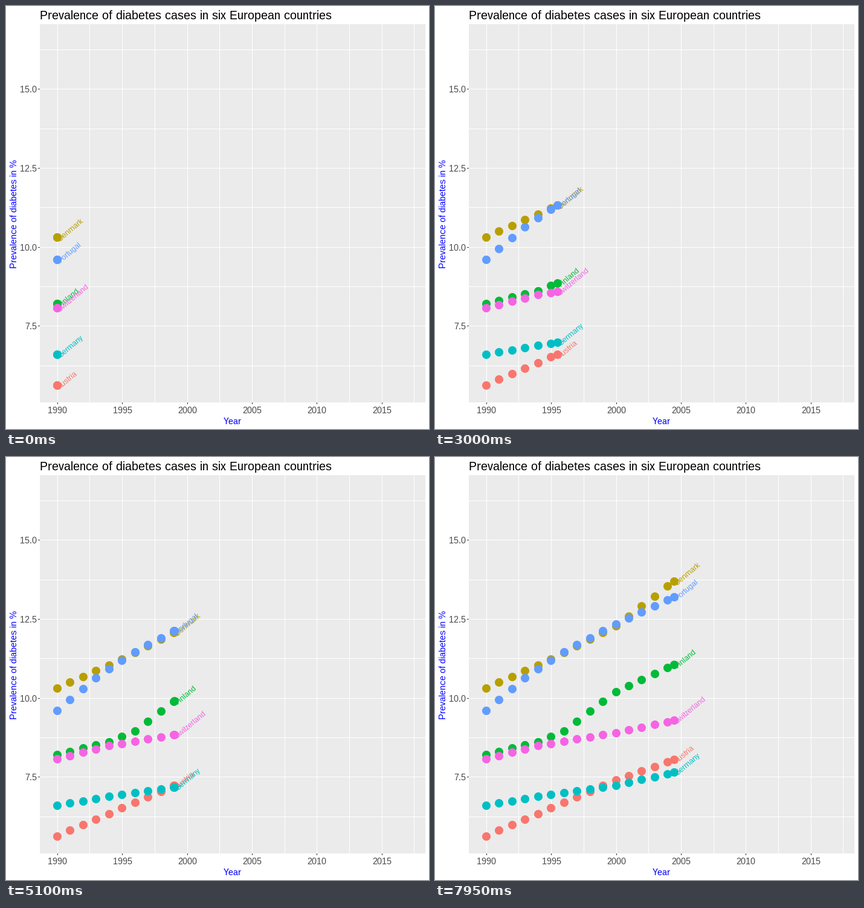
Animation of 700 by 700 pixels, one loop 8000 ms. Source, as a matplotlib script:

```python
import numpy as np
import matplotlib
import matplotlib.pyplot as plt
from matplotlib.animation import FuncAnimation
from matplotlib.collections import PolyCollection
from matplotlib.patches import Rectangle

SIZE, DPI = 700, 100
TICK_MS, STEP_TICKS, LOOP_MS = 50, 3, 8000
STEPS_PER_YEAR = 99 / 27
LEFT, RIGHT, TOP, BOTTOM = 56, 694, 30, 656
RADIUS, LABEL_ANGLE, LABEL_PX = 7, 40, 12

# Colour and turning points of each trend: years since 1990 -> prevalence in %
COUNTRIES = {
    "Austria": ("#F8766D", {0: 5.63, 10: 7.40, 15: 8.12}),
    "Denmark": ("#B79F00", {0: 10.31, 5: 11.22, 10: 12.28, 15: 13.85}),
    "Finland": ("#00BA38", {0: 8.21, 4: 8.61, 6: 8.95, 10: 10.20, 15: 11.15}),
    "Germany": ("#00BFC4", {0: 6.60, 5: 6.95, 10: 7.23, 15: 7.69}),
    "Portugal": ("#619CFF", {0: 9.60, 3: 10.64, 6: 11.46, 10: 12.34, 15: 13.29}),
    "Switzerland": ("#F564E3", {0: 8.07, 4: 8.49, 10: 8.90, 15: 9.33}),
}
YEARS = np.arange(16)
KEY_STEPS = np.round(YEARS * STEPS_PER_YEAR)

# Whole-pixel glyph hinting without kerning
plt.rcParams.update({
    "font.family": "Liberation Sans",
    "text.hinting": "native",
    "text.hinting_factor": 1,
    "text.kerning_factor": 6,
    "toolbar": "None",
})
fig = plt.figure(figsize=(SIZE / DPI, SIZE / DPI), dpi=DPI, facecolor="white")
ax = fig.add_axes([0, 0, 1, 1])
ax.set(xlim=(0, SIZE), ylim=(SIZE, 0))
ax.axis("off")


def px_x(years):
    return np.floor(85.2 + 21.48 * years)


def px_y(value):
    return 529.9 - 52.29 * (value - 7.5)


def box(x, y, w, h, color):
    ax.add_patch(Rectangle((x, y), w, h, facecolor=color, linewidth=0,
                           antialiased=False, zorder=1))


def text(x, y, string, px, color, **kwargs):
    return ax.text(x, y, string, fontsize=px * 72 / DPI, color=color,
                   va="baseline", rotation_mode="anchor", **kwargs)


def draw_background():
    box(LEFT, TOP, RIGHT - LEFT, BOTTOM - TOP, "#EBEBEB")
    for years in np.arange(0, 28, 2.5):
        box(px_x(years), TOP, 1, BOTTOM - TOP, "white")
    for value in np.arange(6.25, 16.5, 1.25):
        box(LEFT, np.floor(px_y(value)), RIGHT - LEFT, 1, "white")
    for years in range(0, 26, 5):
        x = px_x(years)
        box(x, BOTTOM, 1, 3, "#333333")
        text(x + 0.5, 674, str(1990 + years), 15, "#4D4D4D", ha="center")
    for value in (7.5, 10, 12.5, 15):
        y = np.floor(px_y(value))
        box(LEFT - 3, y, 3, 1, "#333333")
        text(51, y + 6, f"{value:.1f}", 15, "#4D4D4D", ha="right")
    text(56, 22, "Prevalence of diabetes cases in six European countries", 20, "black")
    text(375, 692, "Year", 15, "blue", ha="center")
    text(18, 343.5, "Prevalence of diabetes in %", 15, "blue", ha="center", rotation=90)


def eased_years(step):
    """Years since 1990, with cubic in-out easing from one year to the next."""
    k = np.searchsorted(KEY_STEPS, step, side="right") - 1
    u = (step - KEY_STEPS[k]) / (KEY_STEPS[k + 1] - KEY_STEPS[k])
    return k + (4 * u**3 if u < 0.5 else 1 - 4 * (1 - u)**3)


draw_background()
theta = np.linspace(0, 2 * np.pi, 48, endpoint=False)
circle = RADIUS * np.column_stack([np.cos(theta), np.sin(theta)])
tilt = np.radians(LABEL_ANGLE)
label_shift = 0.62 * LABEL_PX * np.array([np.sin(tilt), np.cos(tilt)])

series = []
for order, (name, (color, trend)) in enumerate(COUNTRIES.items()):
    label = text(0, 0, name, LABEL_PX, color, rotation=LABEL_ANGLE, zorder=2 + order / 10)
    dots = PolyCollection([circle], facecolors=color, linewidths=0,
                          snap=False, zorder=3 + order / 10)
    ax.add_collection(dots, autolim=False)
    values = np.interp(YEARS, list(trend), list(trend.values()))
    series.append((values, dots, label))


def update(tick):
    now = eased_years(tick // STEP_TICKS)
    years = np.append(YEARS[YEARS <= now], now)
    artists = []
    for values, dots, label in series:
        ys = np.round(px_y(np.interp(years, YEARS, values)))
        centers = np.column_stack([px_x(years), ys])
        dots.set_verts(list(circle + centers[:, None]))
        label.set_position(centers[-1] + label_shift)
        artists += [dots, label]
    return artists


anim = FuncAnimation(fig, update, frames=LOOP_MS // TICK_MS, interval=TICK_MS,
                     repeat=True, repeat_delay=0, blit=False)
plt.show()
```
